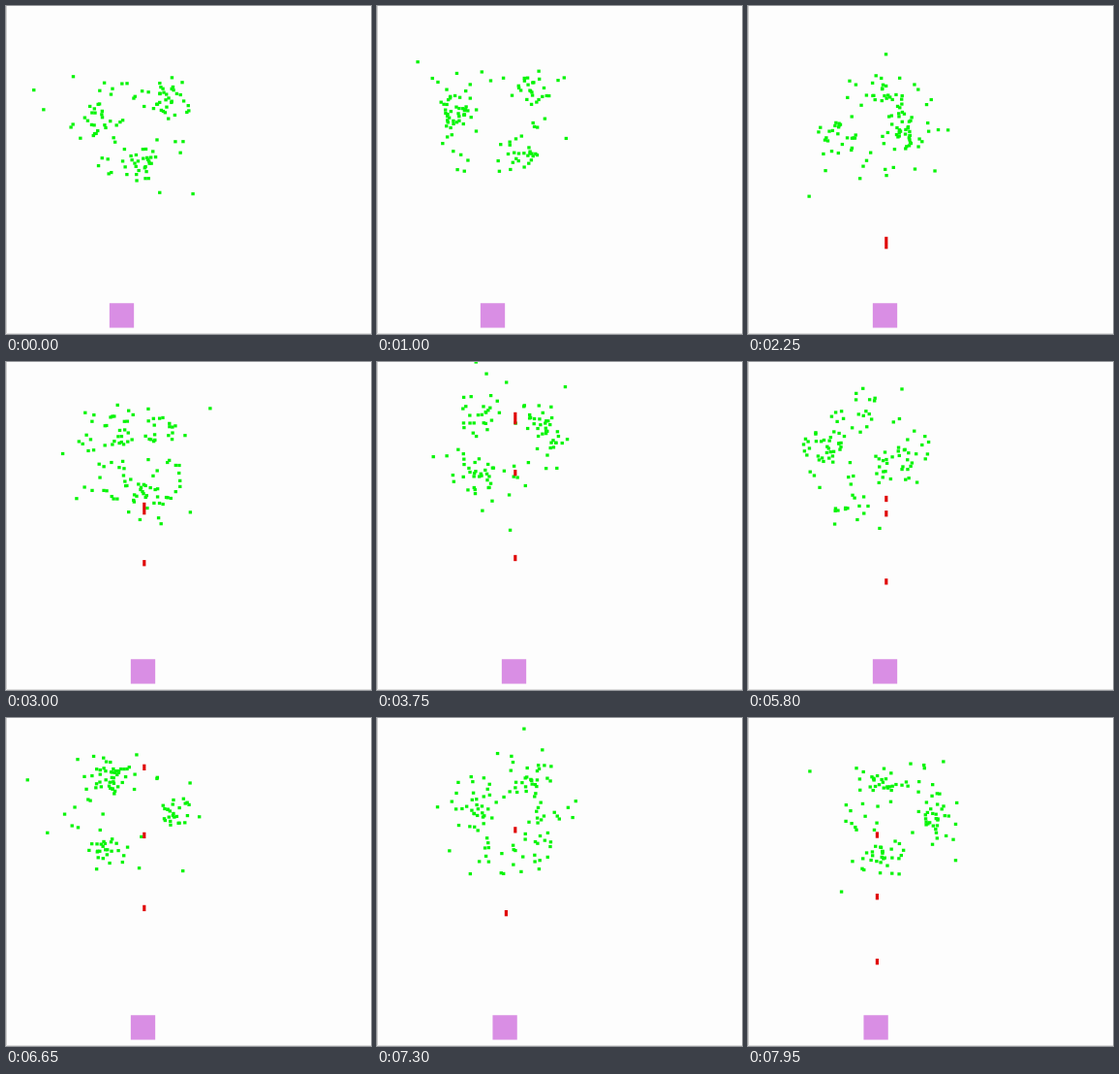
These frames come from a looping animation (377x338 px, 8000 ms). An HTML page with a canvas:

```html
<!DOCTYPE html>
<html lang="en">
<head>
<meta charset="utf-8">
<title>Swarm</title>
<style>
  html, body { margin: 0; width: 100%; height: 100%; overflow: hidden; background: #fdfdfd; }
  canvas { display: block; }
</style>
</head>
<body>
<canvas id="stage" width="377" height="338"></canvas>
<script>
const ctx = document.getElementById('stage').getContext('2d');
const LOOP = 8000, STEP = 50, COUNT = 114, TURN = 3200, TAU = Math.PI * 2;
const MUZZLE = 266, SHOWN_BELOW = 260, SHOT_END = 46, SHOT_SPEED = 6.2 / STEP;
const WALK_SPEED = 3.1 / STEP;

let seed = 11;
const random = () => {
  seed = (seed * 16807) % 2147483647;
  return seed / 2147483647;
};
const bell = () => (random() + random() + random() - 1.5) * 2;
const mix = (a, b, u) => a + (b - a) * u;
const smooth = u => u * u * (3 - 2 * u);

// A swarm is a loose ring about a centre with three hubs, densest first.
const poses = [];
function pose(time, cx, cy, hubs) {
  const teams = [[], []];
  for (let i = 0; i < COUNT; i++) {
    let angle = random() * TAU;
    let radius = 45 + 12 * bell() + 60 * random() ** 12;
    if (random() < 0.66) {
      const [x, y] = hubs[Math.floor(3 * random() ** 1.25)];
      const dx = x + 10 * bell() - cx, dy = y + 10 * bell() - cy;
      angle = Math.atan2(dy, dx);
      radius = Math.hypot(dx, dy);
    } else if (angle > Math.PI) angle -= TAU;
    teams[i % 2].push({ angle, radius });
  }
  teams.forEach(team => team.sort((a, b) => a.angle - b.angle));
  poses.push({ time, cx, cy, teams });
}

pose(0, 136, 122, [[168, 96], [140, 162], [97, 118]]);
pose(1000, 123, 112, [[82, 110], [152, 152], [166, 84]]);
pose(2250, 135, 120, [[164, 130], [92, 136], [138, 88]]);
pose(3750, 137, 84, [[173, 68], [105, 50], [104, 117]]);
pose(4950, 109, 97, [[74, 97], [115, 64], [86, 135]]);
pose(6650, 122, 93, [[110, 60], [104, 136], [174, 98]]);
pose(7950, 153, 103, [[190, 104], [138, 66], [140, 142]]);

const phases = Array.from({ length: COUNT }, () => random() * TAU);

// Rank in the ring, moved on by the orbit; whole laps become full turns.
function orbit(p, team, index) {
  const ring = p.teams[team], n = ring.length;
  const drift = Math.round(p.time / TURN * n) * (team ? -1 : 1);
  const rank = index + drift, lap = Math.floor(rank / n);
  const { angle, radius } = ring[rank - lap * n];
  return { angle: angle + lap * TAU, radius };
}

function block(x, y, w, h) {
  ctx.fillRect(x - w / 2, y - h / 2, w, h);
}

function drawSwarm(t) {
  let k = 0;
  while (k < poses.length - 2 && t >= poses[k + 1].time) k++;
  const a = poses[k], b = poses[k + 1];
  const u = Math.min(1, (t - a.time) / (b.time - a.time)), e = smooth(u);
  const cx = mix(a.cx, b.cx, e), cy = mix(a.cy, b.cy, e);
  ctx.fillStyle = '#08f408';
  for (let i = 0; i < COUNT; i++) {
    const from = orbit(a, i % 2, i >> 1), to = orbit(b, i % 2, i >> 1);
    const angle = mix(from.angle, to.angle, u);
    const sway = 16 * Math.sin(Math.PI * u) * Math.sin(phases[i] + k * 2 + u * 3);
    const radius = mix(from.radius, to.radius, e) + sway;
    block(cx + radius * Math.cos(angle), cy + radius * Math.sin(angle), 3.4, 3.2);
  }
}

// [start, distance]
const moves = [[1300, 22], [4100, -9.4], [4400, 9.4], [6700, -9.4]];

function playerX(t) {
  return moves.reduce((x, [start, way]) => {
    const gone = Math.max(0, (t - start) * WALK_SPEED);
    return x + Math.sign(way) * Math.min(Math.abs(way), gone);
  }, 119.5);
}

const shots = [2048, 2098, 2526, 3234, 4792, 4915, 5480, 6085, 6777, 7290, 7830];

function drawShots(t) {
  ctx.fillStyle = '#e00808';
  for (const start of shots) {
    const y = MUZZLE - (t - start) * SHOT_SPEED;
    if (y < SHOWN_BELOW && y > SHOT_END) block(playerX(start + 100) + 1.3, y, 3.2, 6.3);
  }
}

function drawPlayer(t) {
  ctx.fillStyle = '#d98ee4';
  block(playerX(t), 318.9, 25.3, 25.3);
}

function frame(now) {
  const t = Math.floor(now % LOOP / STEP) * STEP;
  ctx.fillStyle = '#fdfdfd';
  ctx.fillRect(0, 0, 377, 338);
  ctx.fillStyle = '#cfcfcf';
  ctx.fillRect(0, 0, 1, 338);
  ctx.fillStyle = '#dcdcdc';
  ctx.fillRect(0, 337, 377, 1);
  drawPlayer(t);
  drawSwarm(t);
  drawShots(t);
}

const begin = performance.now();
function tick() {
  frame(performance.now() - begin);
  requestAnimationFrame(tick);
}
tick();
</script>
</body>
</html>
```
